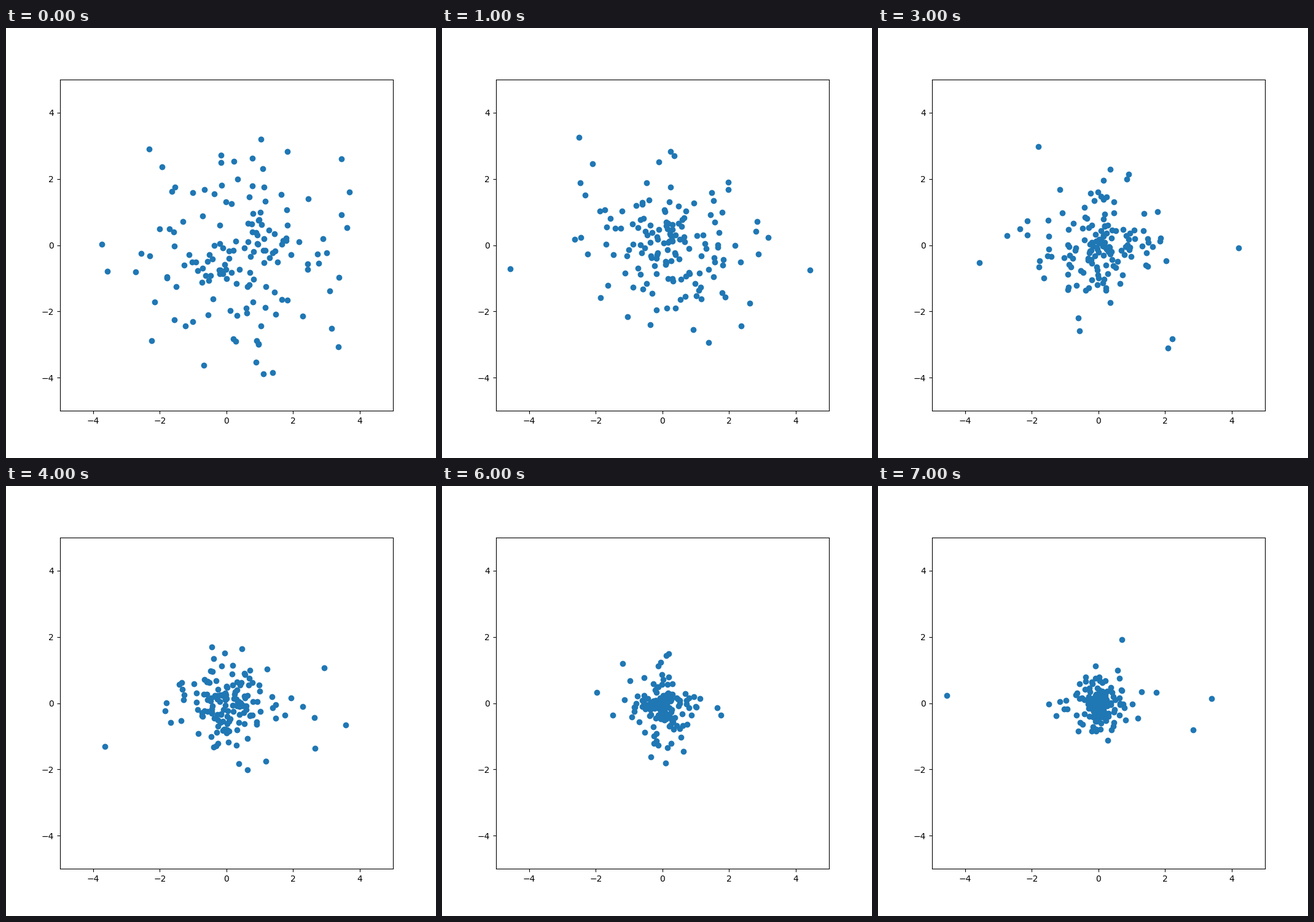
A matplotlib script for the animation above (8 s loop, 700 by 700 pixels).

```python
import numpy as np
import matplotlib.pyplot as plt
from matplotlib.animation import FuncAnimation

STEPS = 8
CORE, STRAYS = 135, 15


def cloud(rng, count, spread, limit):
    """Heavy-tailed points, redrawn where they leave the limit box."""
    points = rng.laplace(0, spread, (20 * count, 2))
    inside = (np.abs(points) < limit).all(axis=1)
    return points[inside][:count]


def swarm(step):
    """A converging core with a few strays that settle more slowly."""
    rng = np.random.default_rng(40 + step)
    limit = (4.8, 4.7 * 0.92 ** step)
    core_spread = 1.35 * 0.8 ** step
    stray_spread = (2 * 0.95 ** step, 1.8 * 0.85 ** step)
    core_limit = 3.5 * 0.9 ** step
    center = np.array([0.45, -0.2]) * 0.6 ** step
    core = center + cloud(rng, CORE, core_spread, core_limit)
    strays = cloud(rng, STRAYS, stray_spread, limit)
    return np.vstack([core, strays])


fig, ax = plt.subplots(figsize=(7, 7), dpi=100)
ax.set(xlim=(-5, 5), ylim=(-5, 5))
ax.set_xticks(range(-4, 5, 2))
ax.set_yticks(range(-4, 5, 2))
dots = ax.scatter(*swarm(0).T, color="#1f77b4")


def draw(step):
    dots.set_offsets(swarm(step))
    return dots,


anim = FuncAnimation(fig, draw, frames=STEPS, interval=1000,
                     repeat=True, repeat_delay=0)
plt.show()
```
